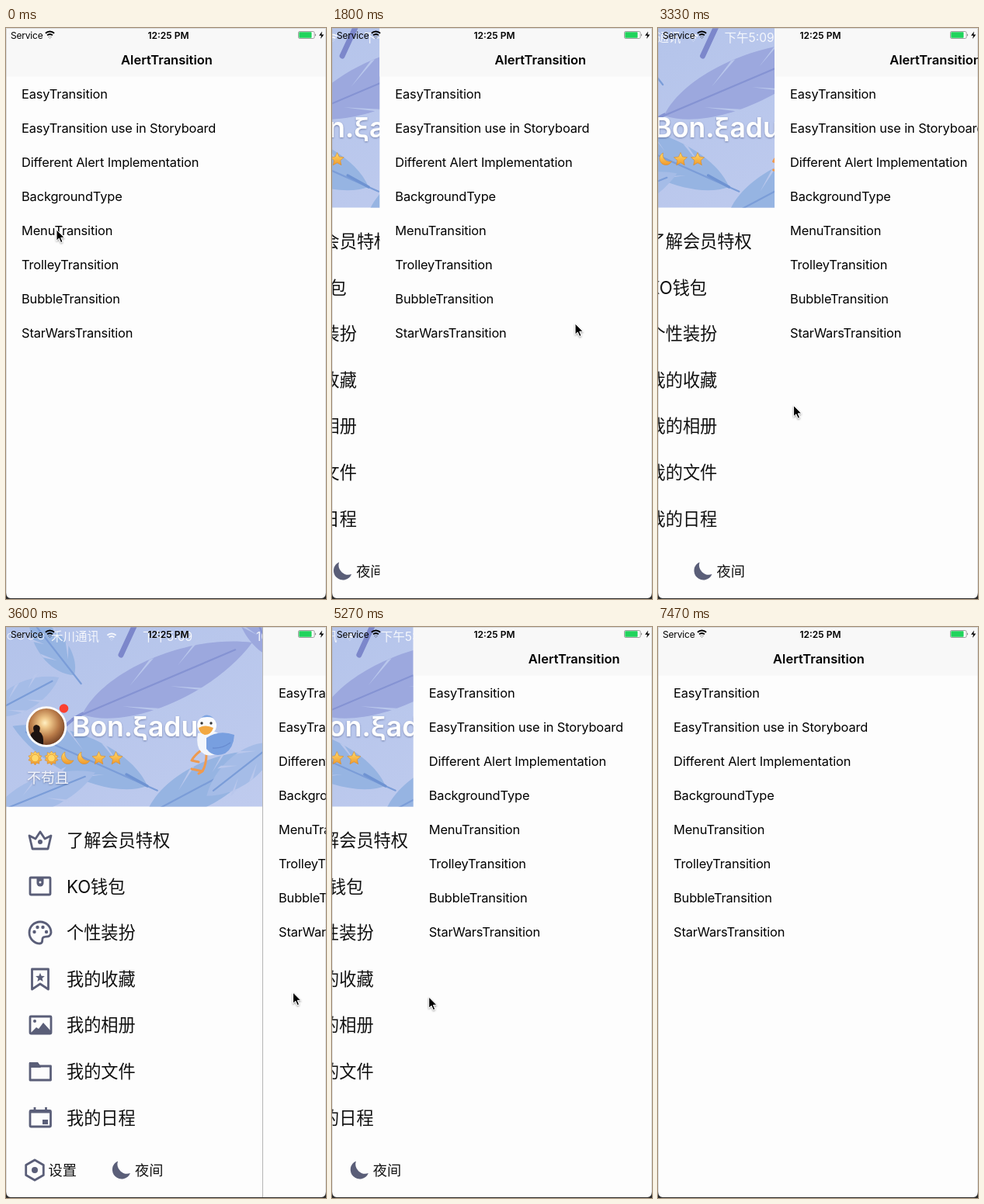
An HTML page that plays this animation: 412x736 px, repeating every 7540 ms.

```html
<!DOCTYPE html>
<html lang="zh-CN">
<head>
<meta charset="utf-8">
<title>AlertTransition</title>
<style>
html, body { margin: 0; width: 100%; height: 100%; overflow: hidden; background: #fdfdfd; }
svg { display: block; width: 412px; height: 736px; }
text { font-family: Inter, "Noto Sans CJK SC", "Noto Sans CJK", sans-serif; white-space: pre; }
.item { font-size: 16.4px; letter-spacing: -.13px; fill: #000; }
.title { font-size: 16.5px; font-weight: 600; letter-spacing: 0; text-anchor: middle; }
.status { font-size: 12px; }
.menu { font-size: 22.2px; fill: #111; }
.foot { font-size: 18.2px; fill: #111; }
.pale { font-size: 15.5px; fill: #fff; fill-opacity: .85; }
.icon { fill: none; stroke: #5a5e78; stroke-width: 2.8; stroke-linejoin: round; }
.icon .solid { fill: #5a5e78; stroke: none; }
</style>
</head>
<body>
<svg id="stage" viewBox="0 0 412 736">
  <defs>
    <clipPath id="headClip"><rect width="330" height="231.5"/></clipPath>
    <linearGradient id="sky" x2="1" y2="1">
      <stop stop-color="#b3c3ea"/><stop offset="1" stop-color="#bfcbee"/>
    </linearGradient>
    <radialGradient id="dusk" cx=".46" cy=".4" r=".62">
      <stop stop-color="#fff0c4"/><stop offset=".2" stop-color="#f0c98c"/>
      <stop offset=".6" stop-color="#b87a48"/><stop offset="1" stop-color="#6a3b22"/>
    </radialGradient>
    <linearGradient id="gold" x2="0" y2="1">
      <stop stop-color="#ffdc6c"/><stop offset="1" stop-color="#f0992c"/>
    </linearGradient>
    <filter id="soft" x="-20%" y="-20%" width="140%" height="150%">
      <feDropShadow dx="0" dy="1" stdDeviation="1.2" flood-color="#35406e" flood-opacity=".55"/>
    </filter>
    <filter id="drop" x="-50%" y="-50%" width="200%" height="200%">
      <feDropShadow dx="0" dy="1.2" stdDeviation="1" flood-opacity=".4"/>
    </filter>
    <g id="wifi" fill="none" stroke-width="1.9">
      <path d="M-5.6 -2.2A8 8 0 0 1 5.6 -2.2M-3.4 .4A4.8 4.8 0 0 1 3.4 .4"/>
      <path d="M0 4.6L-2 2.4A2.8 2.8 0 0 1 2 2.4Z" stroke-width=".3"/>
    </g>
  </defs>

  <g id="panel">
    <rect x="-170" width="501" height="736" fill="#fdfdfd"/>
    <g clip-path="url(#headClip)">
      <rect width="330" height="232" fill="url(#sky)"/>
      <g id="leaves"></g>
      <g id="bird">
        <path d="M250 160Q243 165 239 172L248 174M258 163Q258 177 253 186L239 183M253 186L248 189" fill="none" stroke="#ee9a50" stroke-width="3" stroke-linecap="round" stroke-linejoin="round"/>
        <path d="M247 137Q243 160 258 165Q278 168 284 148Q276 136 266 134Z" fill="#f3f6fc"/>
        <path d="M258 143Q274 132 294 139Q293 156 282 163Q267 169 258 157Z" fill="#789fe0"/>
        <path d="M266 156Q278 157 289 149" fill="none" stroke="#678bd0" stroke-width="1.4"/>
        <ellipse cx="258.500" cy="127" rx="12.500" ry="12" fill="#fafbfe"/>
        <path d="M251 117Q259 110 267 117Q259 115 251 117Z" fill="#7ca4e2"/>
        <circle cx="252" cy="124" r="1.700" fill="#333"/><circle cx="264" cy="124" r="1.700" fill="#333"/>
        <path d="M248 130Q257 125 267 130Q264 139 256 139Q249 137 248 130Z" fill="#f2a842"/>
      </g>
      <g fill="none" stroke="#fff" stroke-opacity=".8" id="dots"></g>
      <text class="pale" x="58" y="18">禾川通讯</text>
      <use href="#wifi" x="136" y="13" stroke="#fff" fill="#fff" opacity=".85"/>
      <text class="pale" x="176" y="18">下午5:09</text>
      <text class="pale" x="322" y="18">100%</text>
      <g id="badges" fill="url(#gold)" stroke="#d98a28" stroke-width=".6"></g>
      <g filter="url(#soft)">
        <text x="85" y="141" font-size="35.500" font-weight="600" fill="#fff">Bon.ξadu</text>
        <text x="27" y="201" font-size="18" fill="#f1f3fa">不苟且</text>
      </g>
      <circle cx="52" cy="128.500" r="24.500" fill="url(#dusk)"/>
      <path d="M31 141Q32 136 36 135Q33 127 39 126Q46 127 43 135Q49 138 48 151.500Q36 150 31 141Z" fill="#1c1210"/>
      <circle cx="52" cy="128.500" r="24.800" fill="none" stroke="#fff" stroke-width="2.800"/>
      <circle cx="74.500" cy="105" r="5.800" fill="#fb4030"/>
    </g>
    <g id="rows"></g>
    <g class="icon">
      <path d="M34 286H54L58 269L50 273L44 264L38 273L30 269Z"/>
      <circle class="solid" cx="44" cy="277" r="3"/>
      <rect x="31" y="323" width="26" height="22" rx="1"/>
      <path class="solid" d="M39.500 323H48.500V330A4.500 4.500 0 0 1 39.500 330Z"/><circle cx="44" cy="329" r="1.500" fill="#fdfdfd" stroke="none"/>
      <path d="M44 380A14 14 0 1 0 44 408C49 407 45 402 48 400S57 401 58 394A14 14 0 0 0 44 380Z"/>
      <g class="solid"><circle cx="36.500" cy="393" r="2.200"/><circle cx="40.500" cy="387" r="2.200"/><circle cx="47.500" cy="387" r="2.200"/><circle cx="52" cy="393" r="2.200"/></g>
      <path d="M33.500 441H54.500V467L44 460L33.500 467Z"/>
      <path class="solid" id="markStar"/>
      <rect x="31" y="502" width="27" height="22" rx="1"/>
      <path class="solid" d="M32 523L39 516L42 518L48 510L57 520V523Z"/><circle class="solid" cx="37" cy="508" r="2"/>
      <path d="M31 584V562.500H40L43 566H57.500V584Z"/><path class="solid" d="M30 561H41L45 568H30Z"/>
      <rect x="31" y="623.500" width="26.500" height="20.500" rx="1"/><path d="M31 625H57.500M37 619V626M51.500 619V626"/>
      <rect class="solid" x="47" y="635" width="7" height="6"/>
      <path d="M37 687L48.300 693.500V706.500L37 713L25.700 706.500V693.500Z"/><circle class="solid" cx="37" cy="700" r="4"/>
      <path class="solid" d="M144 688.500A12 12 0 1 0 160 704A12.500 12.500 0 0 1 144 688.500Z"/>
    </g>
    <text class="foot" x="54.500" y="707">设置</text>
    <text class="foot" x="166" y="707">夜间</text>
    <rect x="330" width="1" height="736" fill="#b5b5b5"/>
  </g>

  <g id="main">
    <rect width="412" height="736" fill="#fdfdfd"/>
    <rect width="412" height="62.500" fill="#f8f8f8"/>
    <text class="title" x="207" y="47">AlertTransition</text>
    <g id="list"></g>
  </g>

  <g id="bar">
    <text class="status" x="6" y="14" letter-spacing="-.2">Service</text>
    <use href="#wifi" x="56.500" y="9" stroke="#000" fill="#000"/>
    <text class="status" x="209" y="14" text-anchor="middle" font-weight="600">12:25 PM</text>
    <rect x="376.500" y="4.500" width="20.500" height="9" rx="1.600" fill="#fff" stroke="#777" stroke-width=".7"/>
    <rect x="377.300" y="5.300" width="16.200" height="7.400" rx=".8" fill="#20d45c"/>
    <path d="M398.300 7.300Q400 9 398.300 10.800Z" fill="#444"/>
    <path d="M407 4.500L403 9.700H406L405 14L409.300 8.400H406.300Z"/>
  </g>
  <path d="M.5 736V.5H411.500V736" fill="none" stroke="#aaa" stroke-opacity=".4"/>
  <path d="M0 728V736H412V728Q411.500 735 406 735H6Q.5 735 0 728Z" fill="#2b2b2b"/>
  <path id="cursor" d="M0 0V14.200L3.300 11.200L5.600 16.600L8 15.600L5.700 10.300H10.200Z" fill="#000" stroke="#fff" stroke-width="1" filter="url(#drop)"/>
</svg>
<script>
const $ = id => document.getElementById(id);
const LOOP = 7540, OPEN = 331;

const items = ['EasyTransition', 'EasyTransition use in Storyboard', 'Different Alert Implementation',
  'BackgroundType', 'MenuTransition', 'TrolleyTransition', 'BubbleTransition', 'StarWarsTransition'];
$('list').innerHTML = items.map((s, i) => `<text class="item" x="20" y="${91 + 44 * i}">${s}</text>`).join('');

const rows = ['了解会员特权', 'KO钱包', '个性装扮', '我的收藏', '我的相册', '我的文件', '我的日程'];
$('rows').innerHTML = rows.map((s, i) => `<text class="menu" x="78" y="${283 + 59.6 * i}">${s}</text>`).join('');

$('dots').innerHTML = [6, 19, 32, 45].map(x => `<circle cx="${x}" cy="12" r="4"/>`).join('');

function star(cx, cy, r, inner, n) {
  let d = '';
  for (let i = 0; i < 2 * n; i++) {
    const a = Math.PI * (i / n - .5), q = i % 2 ? inner : r;
    d += `${i ? 'L' : 'M'}${(cx + q * Math.cos(a)).toFixed(2)} ${(cy + q * Math.sin(a)).toFixed(2)}`;
  }
  return d + 'Z';
}
$('markStar').setAttribute('d', star(44, 452, 6.2, 2.7, 5));

const sun = x => `<path d="${star(x, 169, 9, 6.5, 10)}"/><circle cx="${x}" cy="169" r="4.8" fill="#ffd86a"/>`;
const moon = x => `<path d="M${x - 3} 161A8.200 8.200 0 1 0 ${x + 8} 172A9 9 0 0 1 ${x - 3} 161Z"/>`;
const gem = x => `<path d="${star(x, 169.5, 9, 4.3, 5)}" stroke-linejoin="round"/>`;
$('badges').innerHTML = sun(37.5) + sun(58.5) + moon(79) + moon(100) + gem(119.5) + gem(141.5);

// Leaf growing from its stem at (x, y), with a midrib and slits cut into both edges
function leaf(x, y, len, w, angle, fill, rib) {
  let slits = '';
  for (const [p, side] of [[.22, 1], [.3, -1], [.5, 1], [.58, -1]]) {
    const a = p * len, b = a + len * .15, h = side * w;
    slits += `M${a} ${h * .25}L${b} ${h * .74}H${b + 6}Z`;
  }
  return `<g transform="translate(${x} ${y}) rotate(${angle})">
    <path d="M0 0C${len * .2} ${-w} ${len * .7} ${-w} ${len} 0C${len * .7} ${w} ${len * .2} ${w} 0 0Z" fill="${fill}"/>
    <path d="${slits}" fill="#b9c7ec"/>
    <path d="M-14 0H${len * .9}" stroke="${rib}" stroke-width="2.2" stroke-linecap="round"/></g>`;
}
const violet = '#9ca8de', blue = '#96b4e2', pale = '#a5bce7', deep = '#8593d3', sea = '#7b9dd8';
$('leaves').innerHTML =
  leaf(88, 62, 95, 24, -128, blue, sea) +
  leaf(-20, 112, 100, 24, -28, pale, sea) +
  leaf(345, 40, 120, 28, -115, violet, deep) +
  leaf(98, 113, 238, 42, -23, violet, deep) +
  leaf(182, 205, 190, 36, -156, blue, sea) +
  leaf(-15, 240, 140, 28, -22, pale, sea) +
  leaf(180, 243, 175, 36, -28, blue, sea) +
  leaf(345, 150, 110, 26, 142, pale, sea) +
  '<path d="M166 -3L148 36" stroke="#7c87cb" stroke-width="7" stroke-linecap="round"/>' +
  '<path d="M100 111Q86 117 72 132" fill="none" stroke="#8593d3" stroke-width="4"/>' +
  '<path d="M155 190L182 205" stroke="#6f93d2" stroke-width="3.5" stroke-linecap="round"/>';

// Keys: [time, values, linear?]; the flag belongs to the stretch that ends there
const slide = [[0, [0]], [80, [0]], [460, [OPEN]], [1540, [OPEN]], [1900, [0]], [3120, [0]], [3570, [OPEN]],
  [4525, [OPEN]], [4670, [287], 1], [5270, [105], 1], [5600, [10], 1], [5720, [0]]];
const pointer = [[0, [65, 260]], [180, [65, 260]], [800, [380, 354]], [1600, [380, 354]], [2330, [19.5, 499]],
  [3100, [19.5, 499]], [3600, [369.5, 471]], [4200, [369.5, 471]], [4525, [333, 472]], [4670, [293, 473], 1],
  [5270, [125, 477], 1], [5600, [33, 479], 1], [5730, [-16, 480], 1]];

function at(keys, t) {
  const i = keys.findIndex(k => k[0] > t);
  if (i < 0) return keys[keys.length - 1][1];
  const [t0, a] = keys[i - 1], [t1, b, linear] = keys[i];
  let p = (t - t0) / (t1 - t0);
  if (!linear) p = p * p * (3 - 2 * p);
  return a.map((v, j) => v + (b[j] - v) * p);
}

function draw(t) {
  const [off] = at(slide, t), [x, y] = at(pointer, t);
  $('main').setAttribute('transform', `translate(${off})`);
  $('panel').setAttribute('transform', `translate(${(off - OPEN) / 2})`);
  $('cursor').setAttribute('transform', `translate(${x} ${y})`);
}

const start = performance.now();
function tick() {
  draw((performance.now() - start) % LOOP);
  requestAnimationFrame(tick);
}
draw(0);
requestAnimationFrame(tick);
</script>
</body>
</html>
```
